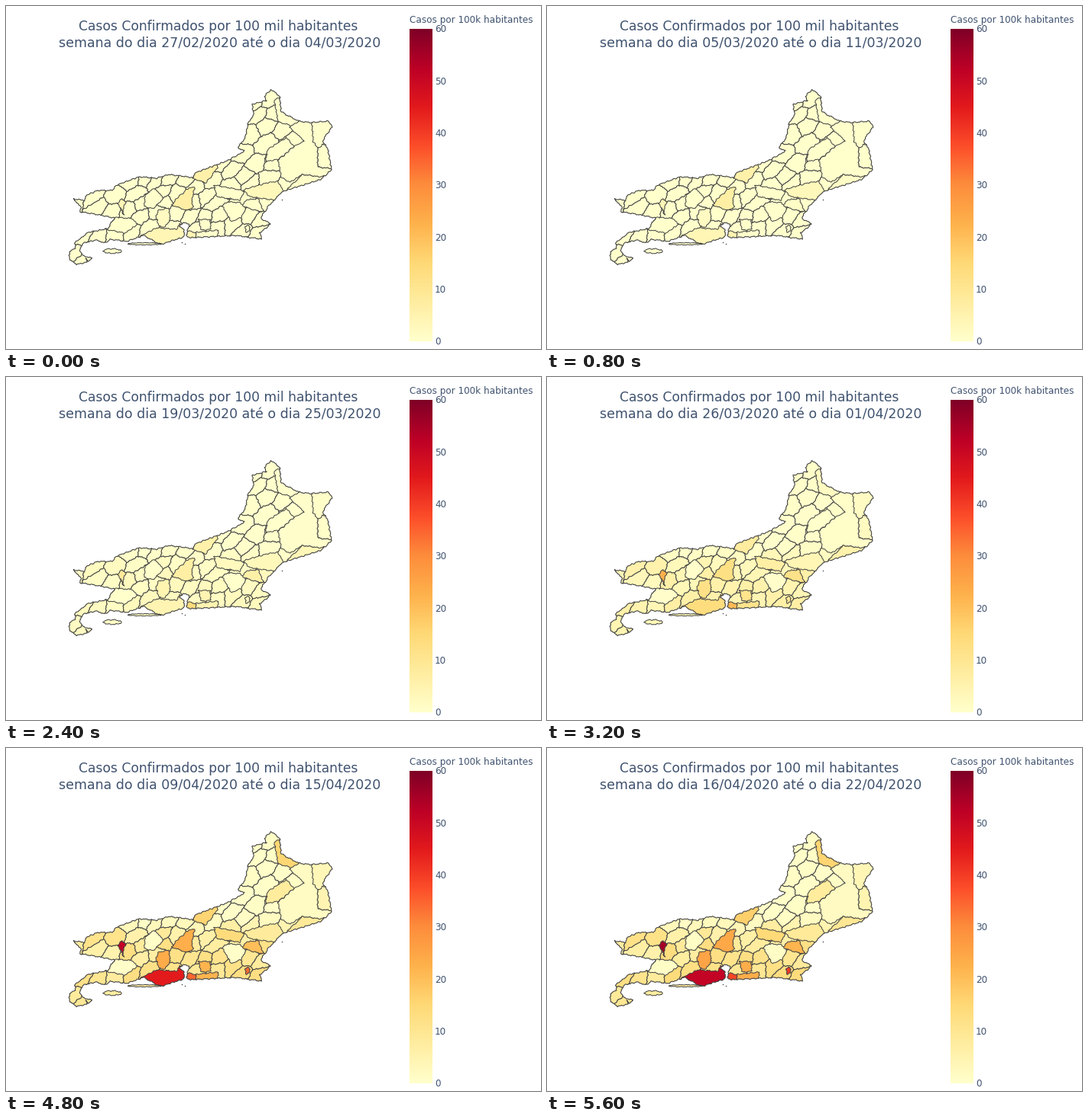
Animation, 700 px wide and 450 px high, one loop 6.4 s. Source, as a matplotlib script:

```python
import numpy as np
import matplotlib
import matplotlib.pyplot as plt
from matplotlib.animation import FuncAnimation
from matplotlib.collections import PolyCollection
from matplotlib.path import Path

W, H, DPI = 700, 450, 100
WEEKS, INTERVAL = 8, 800
TOP = 60
INK, LINE = "#2a3f5f", "#444444"
PX = 72 / DPI
cmap = matplotlib.colormaps["YlOrRd"]
rng = np.random.default_rng(8)
weeks = np.arange(WEEKS)


def points(*xy):
    return np.array(xy, float).reshape(-1, 2)


def rough(poly, amp=1.0):
    """Subdivide the edges and bend them with a shared wave field."""
    out = []
    for a, b in zip(poly, np.roll(poly, -1, axis=0)):
        n = max(1, int(np.hypot(*(b - a)) / 1.2))
        out.append(a + (b - a) * np.arange(n)[:, None] / n)
    p = np.vstack(out)
    x, y = p.T
    dx = .5 * np.sin(.8 * y + .3 * x) + .4 * np.sin(1.7 * y - .6 * x)
    dy = .5 * np.sin(.7 * x - .3 * y + 1) + .4 * np.sin(1.6 * x + .7 * y)
    return p + amp * np.column_stack([dx, dy])


def ellipse(x, y, rx, ry):
    a = np.linspace(0, 2 * np.pi, 12, endpoint=False)
    return np.column_stack([x + rx * np.cos(a), y + ry * np.sin(a)])


def growth(final, start=0, mid=4.1, pace=.75):
    """Weekly rate: an S-curve that never drops below its start."""
    return np.maximum(start, final / (1 + np.exp((mid - weeks) / pace)))


# State outline, clockwise from the south-west
inland = points(
    93, 339, 83, 333, 83, 322, 91, 318, 90, 311, 107, 297, 133, 292, 142, 278,
    116, 273, 97, 270, 98, 263, 88, 253, 102, 255, 106, 248, 120, 242, 138, 242,
    145, 235, 175, 224, 196, 226, 213, 221, 244, 225, 248, 219, 290, 203,
    312, 190, 303, 186, 313, 173, 317, 153, 324, 143, 322, 129, 341, 124,
    338, 118, 347, 110, 358, 118, 360, 139, 383, 151)
coast = points(
    398, 153, 422, 151, 427, 158, 414, 177, 421, 187, 426, 215, 411, 228,
    362, 243, 343, 263, 333, 278, 346, 286, 332, 298, 335, 306, 300, 301,
    240, 304, 236, 300, 240, 286, 231, 284, 227, 289, 233, 294, 233, 303,
    202, 313, 180, 301, 158, 309, 137, 306, 130, 311, 118, 307, 101, 311,
    96, 320, 100, 327, 113, 331, 108, 335, 104, 331, 107, 336)
outline = rough(np.vstack([inland, coast]))
border = Path(np.vstack([outline, outline[:1]]))

# The large or striking municipalities: corners and weekly rates
key_areas = [
    (points(383, 148, 400, 150, 408, 187, 408, 211, 430, 214, 420, 226,
            388, 221, 372, 231, 360, 225, 356, 202, 377, 184, 390, 177,
            371, 159), growth(2)),
    (points(400, 150, 430, 146, 430, 165, 414, 183, 408, 187, 402, 178),
     growth(4)),
    (points(408, 187, 414, 182, 430, 184, 430, 214, 408, 211), growth(5)),
    (points(362, 246, 388, 221, 409, 224, 424, 222, 414, 236),
     growth(11, mid=4, pace=1.5)),
    (points(351, 124, 358, 119, 364, 136, 386, 150, 374, 157, 356, 152),
     growth(16, mid=4.8, pace=.4)),
    (points(342, 188, 367, 173, 377, 184, 368, 192, 356, 201, 340, 204),
     growth(8, mid=4.5, pace=.1)),
    (points(311, 241, 342, 232, 355, 230, 363, 242, 353, 255, 318, 250),
     growth(9, start=3)),
    (points(272, 235, 300, 240, 312, 243, 306, 255, 276, 250), growth(15)),
    (points(244, 226, 247, 217, 275, 205, 277, 212, 262, 232),
     growth(17, start=6)),
    (points(217, 261, 222, 254, 237, 240, 247, 237, 243, 256, 245, 264, 236, 268),
     growth(25, start=7, mid=4)),
    (points(182, 248, 194, 239, 206, 252, 193, 266, 181, 263), growth(1)),
    (points(143, 277, 166, 279, 172, 287, 155, 298, 131, 293), growth(1)),
    (points(146, 259, 152, 253, 157, 257, 153, 267, 154, 274, 151, 266),
     growth(57, start=4, mid=4.3)),
    (points(196, 276, 200, 268, 213, 265, 215, 280, 208, 290, 200, 289),
     growth(26, start=2)),
    (points(176, 302, 197, 291, 224, 293, 227, 286, 237, 290, 237, 306,
            202, 318, 184, 309), growth(54, start=4, mid=4.8)),
    (points(283, 262, 290, 257, 307, 258, 314, 265, 308, 277, 295, 283),
     growth(1)),
    (points(309, 262, 315, 254, 330, 253, 337, 270, 322, 267),
     growth(23, mid=4, pace=1)),
    (points(249, 297, 278, 294, 276, 306, 247, 306), growth(24)),
    (points(252, 280, 267, 280, 268, 293, 255, 294), growth(24)),
    (points(313, 289, 318, 288, 319, 295, 314, 297), growth(43, mid=5)),
    (points(234, 297, 241, 295, 249, 298, 247, 306, 234, 306),
     growth(45, start=4, mid=4.2, pace=1.5)),
]

# All other cells lean to the north-east, like the valleys
tilt, stretch = np.radians(-35), 1.2
spin = np.array([[np.cos(tilt), -np.sin(tilt)], [np.sin(tilt), np.cos(tilt)]])
lean = spin @ np.diag([1 / stretch, stretch]) @ spin.T
unlean = np.linalg.inv(lean)


def scatter_seeds():
    """Random seeds, closer together around the bay, outside the key areas."""
    taken = [Path(p.mean(0) + 1.15 * (p - p.mean(0))) for p, _ in key_areas]
    seeds = []
    for spot in rng.uniform((80, 108), (430, 342), (6000, 2)):
        if not border.contains_point(spot):
            continue
        if any(t.contains_point(spot) for t in taken):
            continue
        gap = 12 + 4 * min(1, abs(spot[0] - 205) / 70)
        if all(np.hypot(*(lean @ (spot - s))) > gap for s in seeds):
            seeds.append(spot)
    return np.array(seeds)


def cell(seed, seeds):
    """Area closer to one seed than to any other."""
    poly = points(60, 90, 450, 90, 450, 350, 60, 350) @ lean.T
    for other in seeds:
        if other is seed:
            continue
        normal = other - seed
        side = (poly - (seed + other) / 2) @ normal
        kept = []
        for k in range(len(poly)):
            j = (k + 1) % len(poly)
            if side[k] <= 0:
                kept.append(poly[k])
            if side[k] * side[j] < 0:
                t = side[k] / (side[k] - side[j])
                kept.append(poly[k] + t * (poly[j] - poly[k]))
        poly = np.array(kept)
    return poly @ unlean.T


spots = scatter_seeds()
leaned = list(spots @ lean.T)
shapes, rates = [], []
for (x, y), seed in zip(spots, leaned):
    south = 1 / (1 + np.exp((236 - y) / 5))
    shapes.append(rough(cell(seed, leaned)))
    rates.append(growth((1 + 10 * south) * rng.uniform(.5, 1.3)))
for corners, rate in key_areas:
    shapes.append(rough(corners))
    rates.append(rate)
rates = np.array(rates)

isles = [rough(ellipse(139, 321.5, 12, 3)), rough(ellipse(181, 312, 22, 1.4), .5)]
dots = [(230, 310), (234, 312), (361, 254)]
isle_rates = growth(8)

fig = plt.figure(figsize=(W / DPI, H / DPI), dpi=DPI, facecolor="white")
ax = fig.add_axes([0, 0, 1, 1])
ax.axis("off")

bar = np.linspace(1, 0, 410)[:, None]
ax.imshow(bar, cmap=cmap, vmin=0, vmax=1, extent=(528, 558, 440, 30),
          aspect="auto", interpolation="nearest")
ax.set_xlim(0, W)
ax.set_ylim(H, 0)

stroke = dict(edgecolors=LINE, linewidths=PX)
land = PolyCollection(shapes, **stroke)
sea = PolyCollection(isles, **stroke)
for part in (land, sea):
    ax.add_collection(part, autolim=False)
land.set_clip_path(border, ax.transData)
ax.add_patch(plt.Polygon(outline, fill=False, ec=LINE, lw=1.1 * PX,
                         joinstyle="round"))
ax.scatter(*zip(*dots), s=1.2, color=LINE, linewidths=0)


def label(x, y, text, size):
    return ax.text(x, y, text, fontsize=size * PX, color=INK, alpha=.9,
                   family="DejaVu Sans", va="baseline")


label(95, 32, "Casos Confirmados por 100 mil habitantes", 17.15)
span = label(69, 54, "", 17.4)
label(528, 22, "Casos por 100k habitantes", 12)
for tick in range(0, TOP + 1, 10):
    label(561, 444.3 - tick * 410 / TOP, str(tick), 12)


def date(n):
    """Day n counted from 27 February 2020."""
    day, month = 27 + n, 2
    for length in (29, 31, 30):
        if day <= length:
            break
        day, month = day - length, month + 1
    return f"{day:02d}/{month:02d}/2020"


def update(week):
    first = 7 * week
    span.set_text(f"semana do dia {date(first)} até o dia {date(first + 6)}")
    land.set_facecolor(cmap(rates[:, week] / TOP))
    sea.set_facecolor(cmap(isle_rates[week] / TOP))
    return land, sea, span


anim = FuncAnimation(fig, update, frames=WEEKS, interval=INTERVAL,
                     repeat=True, repeat_delay=0, blit=False)
plt.show()
```
